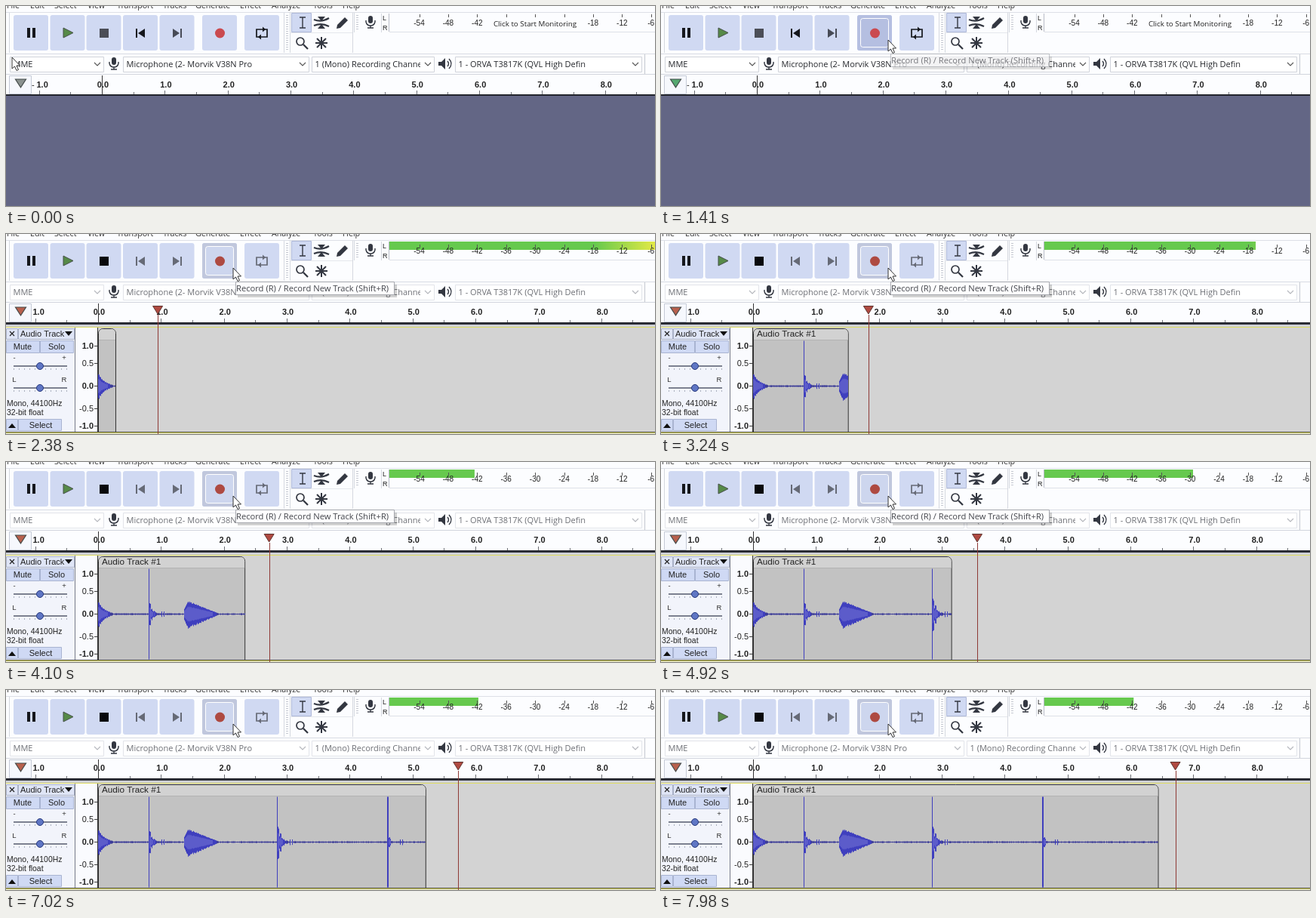
An HTML page with a canvas that plays this animation: 860x265 px, repeating every 8 s.

```html
<!DOCTYPE html>
<html lang="en">
<head>
<meta charset="utf-8">
<title>Recording an audio track</title>
<style>
html, body { margin: 0; width: 860px; height: 265px; overflow: hidden; background: #636685; }
canvas { display: block; width: 860px; height: 265px; }
</style>
</head>
<body>
<canvas id="stage" width="860" height="265"></canvas>
<script>
const ctx = document.getElementById('stage').getContext('2d');
const LOOP = 8000, PX_PER_MS = 0.0858, SECOND = 83.35;
const TRACK_SHOWN = 1520, FIRST_CHUNK = 1984, CHUNK = 399;
const UI = '"Open Sans", sans-serif', ARIAL = '"Liberation Sans", Arial, sans-serif';
const clamp = v => Math.max(0, Math.min(1, v));
const ease = v => v * v * (3 - 2 * v);

function rect(x, y, w, h, fill) {
  ctx.fillStyle = fill;
  ctx.fillRect(x, y, w, h);
}
function box(x, y, w, h, fill, stroke, radius = 0) {
  ctx.beginPath();
  ctx.roundRect(x, y, w, h, radius);
  if (fill) { ctx.fillStyle = fill; ctx.fill(); }
  if (stroke) { ctx.strokeStyle = stroke; ctx.lineWidth = 1; ctx.stroke(); }
}
function poly(points, fill, stroke, width = 1) {
  ctx.beginPath();
  for (let i = 0; i < points.length; i += 2) ctx.lineTo(points[i], points[i + 1]);
  ctx.closePath();
  if (fill) { ctx.fillStyle = fill; ctx.fill(); }
  if (stroke) { ctx.strokeStyle = stroke; ctx.lineWidth = width; ctx.stroke(); }
}
function path(d, stroke, width = 1.5) {
  ctx.strokeStyle = stroke;
  ctx.lineWidth = width;
  ctx.stroke(new Path2D(d));
}
function disc(x, y, r, fill, stroke) {
  ctx.beginPath();
  ctx.arc(x, y, r, 0, 7);
  ctx.fillStyle = fill;
  ctx.fill();
  if (stroke) { ctx.strokeStyle = stroke; ctx.lineWidth = 1; ctx.stroke(); }
}
function label(s, x, y, size, color = '#222', font = ARIAL, align = 'left', weight = '') {
  ctx.font = `${weight} ${size}px ${font}`;
  ctx.textAlign = align;
  ctx.fillStyle = color;
  ctx.fillText(s, x, y);
}

function menu() {
  const items = [['File', 1], ['Edit', 32], ['Select', 64], ['View', 108], ['Transport', 147],
    ['Tracks', 208], ['Generate', 251], ['Effect', 310], ['Analyze', 352], ['Tools', 407], ['Help', 446]];
  for (const [s, x] of items) label(s, x, 3, 10.7, '#333', UI);
}

function transport(recording, hover) {
  const dim = recording ? '#666a76' : '#15171c';
  for (const x of [10, 58.5, 106.5, 155, 203.5, 260, 316]) box(x, 12, 46, 47, '#d0d9f2', null, 3);
  if (hover) {
    box(260, 12, 46, 47, recording ? '#c0c7dd' : '#b5bfe1', null, 3);
    box(264.5, 16.5, 37, 38, recording ? '#cdd6ee' : null, '#fff', 3);
  }
  rect(28, 29, 4, 13, '#15171c');
  rect(35, 29, 4, 13, '#15171c');
  poly([76, 29, 89, 35.5, 76, 42], '#568a48', '#47504a');
  rect(124, 30, 12, 12, recording ? '#08090c' : '#4b4e57');
  rect(172, 30, 2, 12, dim);
  poly([184, 30, 184, 42, 175, 36], dim);
  const next = recording ? dim : '#474b56';
  poly([221, 30, 221, 42, 230, 36], next);
  rect(231, 30, 2, 12, next);
  disc(283.5, 36, 6.5, recording ? '#ae4a41' : '#ca4a4f');
  path('M336 41H332V31H341M342 31H346V41H337', dim, 1.7);
  poly([340, 27.5, 344, 31, 340, 34.5], dim);
  poly([338, 37.5, 334, 41, 338, 44.5], dim);
}

function gripper(x, y0, y1) {
  rect(x, y0, 1, y1 - y0, '#d5d8df');
  for (let y = y0 + 3; y < y1 - 2; y += 3) rect(x + 3, y, 3, 1, '#c6c9d1');
}
function microphone(x, y) {
  box(x - 3, y - 8, 6, 10, '#333741', null, 3);
  path(`M${x - 6} ${y - 2}V${y}Q${x - 5} ${y + 5} ${x} ${y + 5}Q${x + 5} ${y + 5} ${x + 6} ${y}V${y - 2}M${x} ${y + 5}V${y + 8}M${x - 4} ${y + 8}H${x + 4}`, '#333741', 1.4);
}
function tools() {
  gripper(368, 9, 62);
  gripper(461, 9, 35);
  rect(376, 9, 1, 53, '#d5d8df');
  rect(376, 35, 84, 1, '#e5e7ec');
  rect(459, 9, 1, 53, '#d5d8df');
  box(378.5, 9.5, 26, 25, '#d0d9f2', '#aeb8d8');
  path('M389 15H397M393 15V29M389 29H397', '#333741', 1.4);
  path('M408 18Q418 22 428 16M408 26Q418 22 428 27', '#333741', 2.2);
  poly([413, 14, 423, 14, 418, 20], '#333741');
  poly([413, 30, 423, 30, 418, 24], '#333741');
  poly([438, 30, 439, 25, 449, 15, 453, 19, 443, 29], '#333741');
  ctx.beginPath();
  ctx.arc(390, 47, 5, 0, 7);
  ctx.strokeStyle = '#333741';
  ctx.lineWidth = 1.7;
  ctx.stroke();
  path('M394 51L400 57', '#333741', 2.3);
  path('M418 41V57M410 49H426M412 43L424 55M424 43L412 55', '#333741', 2);
}

// Loud moments: time and the meter position they reach.
const PEAKS = [[1540, 816], [2240, 894], [2930, 830], [4221, 894], [5923, 894]];
function meterEnd(t) {
  let end = 624 + 4 * Math.sin(t / 90) * Math.sin(t / 37);
  for (const [at, top] of PEAKS) {
    const rise = clamp((t - at + 40) / 40);
    if (rise > 0) end = Math.max(end, 508 + (top - 508) * rise - 0.378 * Math.max(0, t - at - 200));
  }
  return Math.min(860, end);
}
function meter(t, recording) {
  microphone(483, 21);
  rect(497, 10, 1, 25, '#d5d8df');
  label('L', 499, 19, 9);
  label('R', 499, 32, 9);
  rect(507, 10, 1, 24, '#b8bcc6');
  rect(508, 34, 352, 1, '#dde0e7');
  if (recording) {
    const color = ctx.createLinearGradient(780, 0, 862, 0);
    color.addColorStop(0, '#66c94e');
    color.addColorStop(1, '#e6ea45');
    rect(508, 10, meterEnd(t) - 508, 11, color);
  }
  for (let i = 0; i < 9; i++) {
    const x = 547.5 + i * 38.4, db = -54 + i * 6;
    rect(Math.round(x), recording ? 14 : 11, 1, 4, '#555');
    if (recording || i < 3 || i > 5) label(db, x, 26, 10, '#222', ARIAL, 'center');
  }
  if (!recording) label('Click to Start Monitoring', 701, 26.5, 9.8, '#222', UI, 'center');
}

function dropdown(x, w, s, color, recording) {
  box(x + .5, 67.5, w, 20, '#fff', recording ? '#e2e4e9' : '#d0d3da');
  ctx.save();
  ctx.beginPath();
  ctx.rect(x, 68, w - 18, 19);
  ctx.clip();
  label(s, x + 4.5, 81, 11, color, UI);
  ctx.restore();
  const cx = x + w - 8;
  path(`M${cx - 4} 75L${cx} 79L${cx + 4} 75`, recording ? '#b4b6bc' : '#555', 1.1);
}
function devices(recording) {
  const color = recording ? '#6e7076' : '#26282d';
  rect(0, 63, 860, 1, '#d9dce3');
  rect(0, 90, 860, 1, '#d2d5dd');
  rect(846, 64, 1, 26, '#c4c8d0');
  dropdown(5, 124, 'MME', color, recording);
  microphone(143, 76);
  dropdown(155, 246, 'Microphone (2- Morvik V38N Pro', color, recording);
  dropdown(405, 162, '1 (Mono) Recording Channels', color, recording);
  poly([573, 74, 577, 74, 582, 69, 582, 84, 577, 79, 573, 79], '#333741');
  path('M585 73Q588 76.5 585 80M587 70Q593 76.5 587 83', '#333741', 1.4);
  dropdown(595, 247, '1 - ORVA T3817K (QVL High Defin', color, recording);
}

function ruler(t, recording) {
  const zero = recording ? 122.5 : 127.5;
  rect(0, 91, 860, 27, '#fcfdff');
  for (let i = -2; i < 18; i++) {
    const x = zero + i * SECOND / 2, whole = i % 2 === 0;
    rect(Math.floor(x), whole ? 112 : 114, 1, whole ? 6 : 4, '#6c6e74');
    if (whole) label(Math.abs(i / 2).toFixed(1), x + 1 + (i < 0 ? 3 : 0), recording ? 107 : 108, 11, '#222', ARIAL, 'center', 'bold');
  }
  if (!recording) label('-', 34, 108, 11);
  rect(Math.floor(zero), 92, 1, 26, '#333');
  box(4.5, 92.5, 29, 24, '#f6f8fd', '#c5cad6');
  const pin = recording ? '#b8604d' : t > 800 ? '#55a870' : '#8b928f';
  poly([12.5, 97, 26.5, 97, 19.5, 108], pin, '#434a49', 1.2);
  rect(0, 117, 860, 2, '#23252d');
}

const hash = n => { const v = Math.sin(n * 127.1) * 43758.5453; return v - Math.floor(v); };
// Position, width of the full-height line, height and fall-off of its echo.
const SPIKES = [[189, 1, 36, 3.5], [359, 1, 36, 4.5], [505, 2, 34, 2]];
function loudness(x) {
  let h = 0.4 + 0.8 * hash(x + 900);
  if (x < 142) h = Math.max(h, 19 * Math.exp((122 - x) / 8) * (0.75 + 0.3 * hash(x)));
  if (x >= 236 && x < 282) h = Math.max(h, x < 241 ? 7 + (x - 236) * 2 : 1 + (281 - x) * 0.39 * (0.92 + 0.15 * hash(x)));
  for (const [at, width, top, fall] of SPIKES) {
    const past = x - at;
    if (past >= 0 && past < width) return 60;
    if (past > 0 && past < 18) h = Math.max(h, top * Math.exp(-past / fall) * (0.4 + 0.6 * hash(x * 3)));
    if (past === 17 || past === 20) h = Math.max(h, 3.5);
  }
  return h;
}
function clip(t) {
  if (t < FIRST_CHUNK) return;
  const end = 145 + CHUNK * PX_PER_MS * Math.floor((t - FIRST_CHUNK) / CHUNK);
  box(122.5, 125.5, end - 122, 137, '#c2c2c2', '#333', [6, 6, 0, 0]);
  box(123, 126, end - 123, 14, '#d2d2d2', null, [5, 5, 0, 0]);
  rect(123, 140, end - 123, 1, '#b2b2b2');
  if (end > 215) label('Audio Track #1', 127, 136, 11.7);
  for (let x = 122; x < end; x++) {
    const h = loudness(x), low = Math.min(60, h * (1 + 0.2 * hash(x + 50)));
    rect(x, 201.5 - h, 1, h + low, h < 2 ? '#3c3c98' : '#3f3fbe');
    if (h > 4 && h < 50) rect(x, 201.5 - h * .6, 1, h * 1.2, '#5c5cca');
  }
}

function slider(y, left, right) {
  label(left, 11, y - 8, 9.5, '#333', ARIAL, 'center');
  label(right, 77, y - 8, 9.5, '#333', ARIAL, 'center');
  rect(10, y - 1, 71, 2, '#7c8190');
  for (let x = 10; x <= 80; x += 7) rect(x, y + 3, 1, 2, '#a9afbd');
  disc(45, y, 4.5, '#5f76c4', '#28397c');
}
function track(t) {
  rect(0, 119, 860, 146, '#d3d3d3');
  rect(0, 118, 860, 2, '#2c2e36');
  rect(0, 120, 860, 3, '#cfd1d6');
  rect(0, 124, 92, 138, '#f2f4fb');
  box(.5, 125.5, 15, 14, '#dfe5f6', '#aab2c8');
  path('M5 129L11 135M11 129L5 135', '#222', 1.2);
  box(16.5, 125.5, 74, 14, '#dfe5f6', '#aab2c8');
  label('Audio Track', 19, 136, 11);
  poly([78, 129, 88, 129, 83, 135], '#111');
  for (const [s, x] of [['Mute', 0], ['Solo', 45]]) {
    box(x + .5, 141.5, 44, 16, '#cfd9f4', '#a9b4d1');
    label(s, x + 22, 153, 11, '#222', ARIAL, 'center');
  }
  slider(175, '-', '+');
  slider(204, 'L', 'R');
  label('Mono, 44100Hz', 1, 228, 10.4);
  label('32-bit float', 1, 240, 10.4);
  box(.5, 245.5, 15, 15, '#cfd9f4', '#a9b4d1');
  poly([3, 257, 13, 257, 8, 251], '#111');
  box(16.5, 245.5, 57, 15, '#cfd9f4', '#a9b4d1');
  label('Select', 46, 257, 11, '#222', ARIAL, 'center');

  rect(92, 124, 29, 138, '#fafbfe');
  rect(91, 124, 1, 138, '#777b87');
  rect(121, 124, 1, 138, '#333');
  [['1.0', 148], ['0.5', 171], ['0.0', 201], ['-0.5', 231], ['-1.0', 254]].forEach(([s, y], i) => {
    label(s, 116, y + 4, 11, '#222', ARIAL, 'right', i % 2 ? '' : 'bold');
    rect(117, y, 4, 1, '#444');
  });
  clip(t);
  rect(0, 123, 860, 1, '#dfdc62');
  rect(0, 262, 860, 1, '#4a4b3c');
  rect(0, 263, 860, 1, '#dfdc62');
}
function playhead(t) {
  const x = 201 + (t - 2380) * PX_PER_MS;
  rect(Math.round(x), 107, 1, 158, '#8e3935');
  poly([x - 6.5, 95.5, x + 6.5, 95.5, x, 106], '#b04a41', '#5f3530');
}

function tooltip(t) {
  const alpha = clamp((t - 1270) / 200) * clamp((5900 - t) / 140);
  if (!alpha) return;
  ctx.save();
  ctx.globalAlpha = alpha;
  rect(307, 67, 211, 17, 'rgba(0,0,0,.18)');
  box(304.5, 63.5, 210, 17, '#fdfdfe', '#a5a7ad');
  label('Record (R) / Record New Track (Shift+R)', 305, 76, 11.2, '#44464c', UI);
  ctx.restore();
}
function pointer(t) {
  const k = ease(clamp((t - 40) / 800));
  ctx.save();
  ctx.translate(8 + 293 * k, 68 - 23 * k);
  poly([0, 0, 0, 15, 3.5, 12, 6, 17.5, 8.5, 16.5, 6, 11, 10.5, 11], '#fff', '#333', 1);
  ctx.restore();
}

function draw(t) {
  const recording = t >= TRACK_SHOWN;
  rect(0, 0, 860, 265, '#636685');
  rect(0, 0, 860, 118, '#fcfdff');
  menu();
  rect(0, 8, 860, 1, '#dde0e7');
  rect(4, 9, 1, 53, '#d5d8df');
  transport(recording, t > 740);
  tools();
  meter(t, recording);
  devices(recording);
  ruler(t, recording);
  if (recording) {
    track(t);
    playhead(t);
  }
  tooltip(t);
  pointer(t);
}

const began = performance.now();
function tick() {
  draw((performance.now() - began) % LOOP);
  requestAnimationFrame(tick);
}
tick();
</script>
</body>
</html>
```
